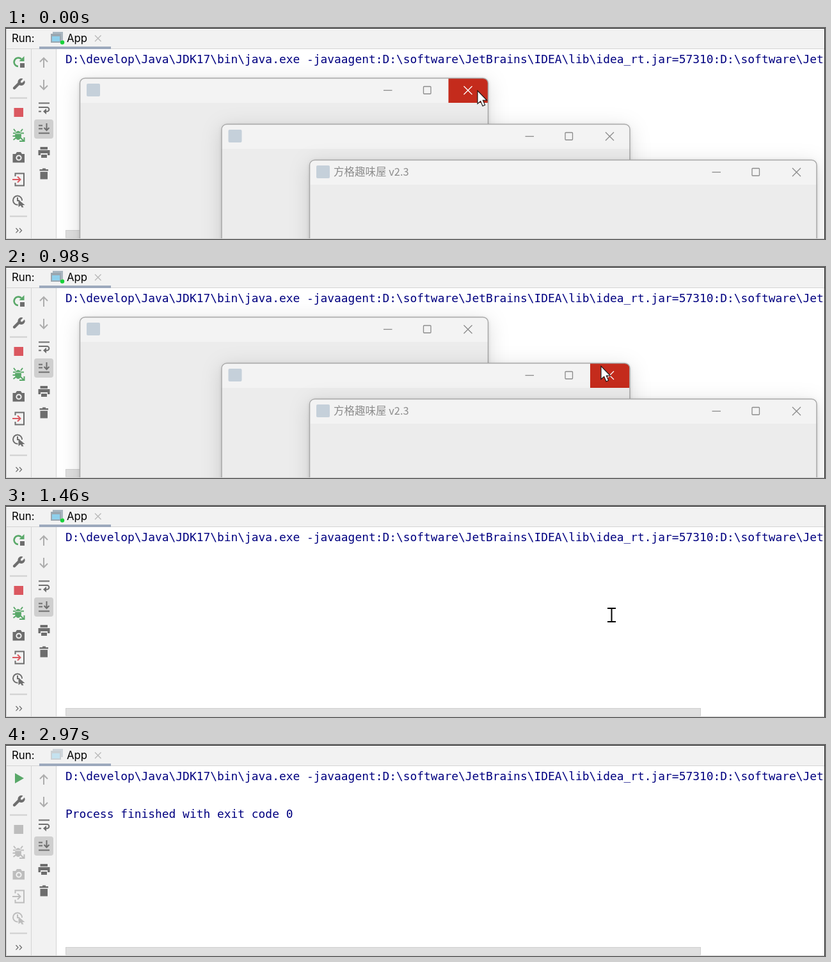
These frames come from a looping animation (1280x330 px, 3010 ms). An HTML page:

```html
<!DOCTYPE html>
<html lang="en">
<head>
<meta charset="utf-8">
<title>Run console</title>
<style>
html, body { margin: 0; width: 100%; height: 100%; overflow: hidden; background: #fff; }
svg { display: block; width: 1280px; height: 330px; --ink: #6e6e6e; --green: #59a869; --red: #db5860; }
svg.idle { --ink: #bdbdbd; --green: #bdbdbd; --red: #bdbdbd; }
.mono { font: 17.9px "DejaVu Sans Mono", "Noto Sans Mono", monospace; fill: #000080; white-space: pre; }
.label { font: 16.8px Inter, "Open Sans", sans-serif; }
.title { font: 16.5px "Noto Sans CJK SC", "Noto Sans CJK", "Noto Sans", sans-serif; fill: #8c8c8c; }
.line { fill: none; stroke: #6e6e6e; stroke-width: 2; }
.live { fill: none; stroke: var(--ink); stroke-width: 2; }
.solid { fill: #6e6e6e; }
.soft { fill: none; stroke: #adadad; stroke-width: 2; }
.frame { filter: drop-shadow(0 1px 3px rgba(0, 0, 0, .14)) drop-shadow(0 6px 16px rgba(0, 0, 0, .14)); }
.buttons { fill: none; stroke: #8a8a8a; stroke-width: 1.3; }
.active .buttons { stroke: #000; }
.active .bar { fill: #fdfdfd; }
.hot { fill: #c42b1c; visibility: hidden; }
.hover .hot { visibility: visible; }
.hover .cross { stroke: #fff; }
.active .cross { visibility: hidden; }
#play, .idle #rerun, .idle .dot { display: none; }
.idle #play { display: inline; }
.idle #tabIcon { opacity: .45; }
#beam { mix-blend-mode: difference; }
</style>
</head>
<body>
<svg id="stage" viewBox="0 0 1280 330">
  <rect width="1280" height="330" fill="#fff"/>
  <rect width="1280" height="33" fill="#f2f2f2"/>
  <rect y="33" width="78" height="297" fill="#f2f2f2"/>
  <path d="M39.5 33V330M78.5 33V330M0 32.5H1279" stroke="#d4d4d4" fill="none"/>

  <!-- tab -->
  <text class="label" x="9" y="21.5">Run:</text>
  <text class="label" x="95" y="21.5">App</text>
  <rect x="52" y="29" width="112" height="4" fill="#9ca9bd"/>
  <path d="M139 11.5l9.5 9.5M148.5 11.5l-9.5 9.5" stroke="#b8b8b8" stroke-width="1.3"/>
  <g id="tabIcon">
    <path d="M73 6h16v13h-3V10H73z" fill="#a9b6c0"/>
    <rect x="70" y="9" width="16" height="14" fill="#9aa7b0"/>
    <rect x="72" y="13" width="12" height="8" fill="#8fd0ec"/>
  </g>
  <circle class="dot" cx="88" cy="22.5" r="3.2" fill="#18d13a"/>

  <!-- run controls -->
  <g id="rerun">
    <path d="M24 48.5A6.7 6.7 0 1 0 19 60" fill="none" stroke="#59a869" stroke-width="2.6"/>
    <path d="M20.5 52H28.5V44z" fill="#59a869"/>
    <rect x="22" y="55" width="7" height="7" fill="#6e6e6e"/>
  </g>
  <path id="play" d="M14 44L28 52L14 60z" fill="#59a869"/>
  <path d="M13 94L21 86" stroke="#6e6e6e" stroke-width="4.4" stroke-linecap="round"/>
  <path d="M26.5 79.5l-3.5 3.5v2.5h2.5l3.5-3.5a5.6 5.6 0 1 1-2.5-2.5z" class="solid"/>
  <path d="M6 109.5H33M6 294.5H33" stroke="#cfcfcf" stroke-width="2"/>
  <rect x="12.5" y="125" width="14.5" height="14" fill="var(--red)"/>
  <g stroke="var(--green)" fill="none" stroke-width="2">
    <ellipse cx="19" cy="168" rx="5" ry="7" fill="var(--green)" stroke="none"/>
    <path d="M15 162l-3-4M23 162l3-4M11 164.5h17M10.5 169h10M11.5 175l4-3M21 177h7M22 171l6 6M28.5 171v7"/>
    <path d="M14.5 165h9" stroke="#f2f2f2" stroke-width="1"/>
  </g>
  <path d="M10.5 197h4.5l2-3h6l2 3h4v13.5H10.5z" fill="var(--ink)"/>
  <circle cx="20" cy="203" r="3.6" fill="var(--ink)" stroke="#f2f2f2" stroke-width="2"/>
  <path class="live" d="M14.5 232v-4.500H28V246.5H14.5V242"/>
  <path d="M10 237h12M18 232.5l4.5 4.5-4.5 4.5" fill="none" stroke="var(--red)" stroke-width="2"/>
  <path class="live" d="M25 270a7 7 0 1 0-6.500 6.5M18 265v5h3"/>
  <path d="M19.500 268.500l10 8.5h-4l2 3.500h-3l-1.500-3-3.500 2.500z" fill="var(--ink)"/>
  <path class="line" d="M15.5 313l3.5 3.7-3.5 3.7M21 313l3.5 3.7-3.5 3.7" style="stroke-width:1.3"/>

  <!-- console controls -->
  <path class="soft" d="M59 62V47M53 53l6-6 6 6M59 81V96M53 90l6 6 6-6"/>
  <path class="line" d="M51 117.5H68M51 124h13a3.3 3.3 0 0 1 0 6.6H60M51 130.5h4"/>
  <path class="solid" d="M63 126v9l-5-4.5z"/>
  <rect x="44" y="143" width="30" height="30" rx="4" fill="#cfcfcf"/>
  <path class="line" d="M51 152.5h6M51 157.5h6M51 164.5H68M63.5 149v10M59.5 156l4 4 4-4"/>
  <path class="solid" d="M53.5 186h11.5v4H53.5zM50.5 191H68.5v8H65V196H54v3H50.5zM55 198h9v5h-9z"/>
  <path class="solid" d="M52.5 221H57v-1.500h5V221h4v2.5H52.5zM53.5 225H65v11.5H53.5z"/>

  <!-- console -->
  <text class="mono" x="93" y="55">D:\develop\Java\JDK17\bin\java.exe -javaagent:D:\software\JetBrains\IDEA\lib\idea_rt.jar=57310:D:\software\Jet</text>
  <text class="mono" id="exit" x="93" y="114">Process finished with exit code 0</text>
  <rect x="93.5" y="316.5" width="992" height="11.5" fill="#e0e0e0" stroke="#d0d0d0"/>
  <g id="windows"></g>
  <path d="M0 .5H1279.5V330" fill="none" stroke="#1c1c1c"/>
  <path d="M.5 1V329.5H1279" fill="none" stroke="#cfcfcf"/>

  <path id="arrow" d="M0 0V20.5L4.7 16.3L8 24L11.6 22.4L8.3 15H14.5z" fill="#fff" stroke="#111" stroke-width="1.1"/>
  <path id="beam" d="M-6 -10H7M-6 11H7M.5 -10V11" fill="none" stroke="#fff" stroke-width="2"/>
</svg>
<script>
const LOOP = 3010, STEPS = 74, STEP = LOOP / STEPS;
const byId = id => document.getElementById(id);
const stage = byId('stage'), arrow = byId('arrow'), beam = byId('beam'), exitLine = byId('exit');

// Left, top, width, height, the point each window shrinks towards and by how much.
const windows = [
  { x: 115, y: 78, w: 639, h: 560, ox: 355, oy: 358, shrink: .06 },
  { x: 336.5, y: 150, w: 639, h: 450, ox: 564, oy: 377, shrink: .05 },
  { x: 474, y: 206, w: 793.5, h: 750, ox: 790, oy: 583, shrink: .06 }
];
windows[2].title = '方格趣味屋 v2.3';

// Pointer path: step, x, y.
const path = [
  [0, 737, 98], [3, 752, 110], [8, 795, 132], [11, 846, 150], [13, 882, 161],
  [17, 908, 175], [20, 922, 170], [24, 930, 155], [26, 946, 170], [61, 946, 170],
  [66, 1029, 185], [72, 1183, 325], [73, 1200, 360]
];

const CLOSE = 27, GONE = 36, STOPPED = 50, FINISHED = 51;

function windowMarkup({ w, h, title = '' }) {
  return `<rect class="frame" x=".5" y=".5" width="${w - 1}" height="${h}" rx="8" fill="#ececec"/>
    <path class="bar" d="M0 39V8Q0 0 8 0H${w - 8}Q${w} 0 ${w} 8V39z" fill="#f3f3f3"/>
    <path class="hot" d="M${w - 62.5} 39V1H${w - 8}Q${w - 1} 1 ${w - 1} 8V39z"/>
    <rect x=".5" y=".5" width="${w - 1}" height="${h}" rx="8" fill="none" stroke="#a8a8a8" stroke-width="1.5"/>
    <rect x="11" y="9" width="21" height="20" rx="2" fill="#c5d0da"/>
    <text class="title" x="38" y="25">${title}</text>
    <g class="buttons">
      <path d="M${w - 164} 19.5h13.5"/>
      <rect x="${w - 101.5}" y="13.5" width="11.5" height="11.5" rx="1"/>
      <path class="cross" d="M${w - 38.5} 13l13 13m0-13l-13 13"/>
    </g>`;
}

for (const win of windows) {
  win.node = document.createElementNS('http://www.w3.org/2000/svg', 'g');
  win.node.innerHTML = windowMarkup(win);
  byId('windows').append(win.node);
}

function pointerAt(step) {
  const i = Math.max(1, path.findIndex(p => p[0] >= step));
  const [s0, x0, y0] = path[i - 1], [s1, x1, y1] = path[i];
  const k = (step - s0) / (s1 - s0);
  return [Math.round(x0 + (x1 - x0) * k), Math.round(y0 + (y1 - y0) * k)];
}

const inside = (px, py, x, y, w, h) => px >= x && px < x + w && py >= y && py < y + h;

function render(time) {
  const step = Math.floor((time % LOOP + 8) / STEP) % STEPS;
  const [px, py] = pointerAt(step);
  const closing = step >= CLOSE;
  const fade = Math.min(1, Math.max(0, (step - CLOSE + 1) / (GONE - CLOSE + 1)) ** 1.6);

  windows.forEach(({ node, x, y, w, ox, oy, shrink }, i) => {
    node.setAttribute('transform',
      `translate(${ox} ${oy}) scale(${1 - shrink * fade}) translate(${x - ox} ${y - oy})`);
    node.style.opacity = 1 - fade;
    node.style.display = fade === 1 ? 'none' : '';
    node.classList.toggle('active', closing && i === 1);
    node.classList.toggle('hover', inside(px, py, x + w - 63, y, 63, 39));
  });

  const overWindow = step <= CLOSE && windows.some(o => inside(px, py, o.x, o.y, o.w, o.h));
  const place = `translate(${px} ${py})`;
  arrow.setAttribute('transform', place);
  beam.setAttribute('transform', place);
  arrow.style.display = overWindow ? '' : 'none';
  beam.style.display = overWindow ? 'none' : '';
  stage.classList.toggle('idle', step >= STOPPED);
  exitLine.style.display = step >= FINISHED ? '' : 'none';
}

const start = performance.now();
function tick() {
  render(performance.now() - start);
  requestAnimationFrame(tick);
}
tick();
</script>
</body>
</html>
```
